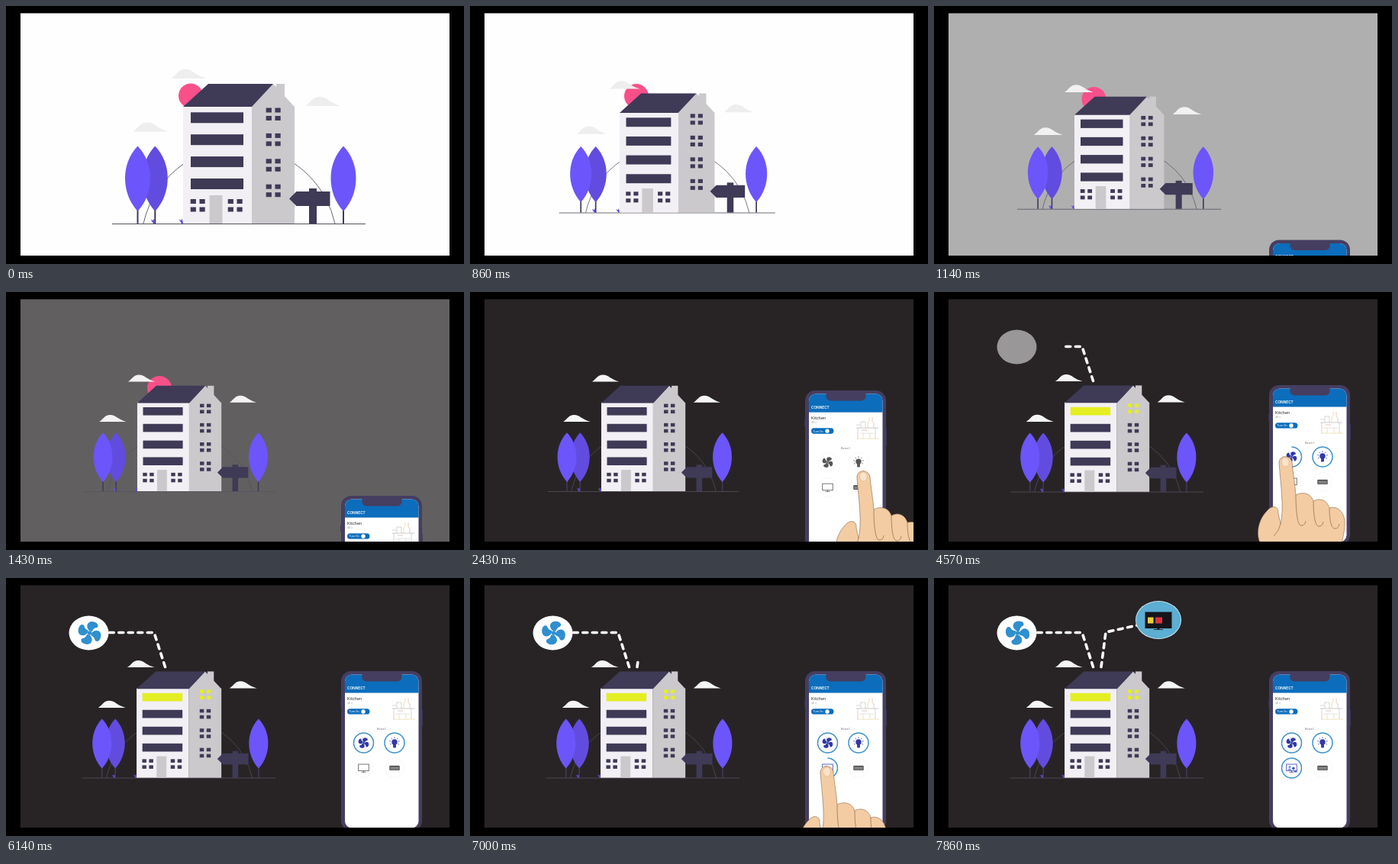
Write an HTML page with a canvas that moves like this. It is 600 by 338 pixels and loops after 8000 ms.

```html
<!DOCTYPE html>
<html lang="en">
<head>
<meta charset="utf-8">
<title>Smart home</title>
<style>
html, body { margin: 0; width: 100%; height: 100%; overflow: hidden; background: #000; }
canvas { display: block; width: 100vw; height: 100vh; }
</style>
</head>
<body>
<canvas id="stage"></canvas>
<script>
const canvas = document.getElementById('stage');
const c = canvas.getContext('2d');
const W = 600, H = 338, LOOP = 8000, FPS = 7;
const ratio = window.devicePixelRatio || 1;
canvas.width = W * ratio;
canvas.height = H * ratio;

const DARK = '#3f3a56', VIOLET = '#6c55fa', SKIN = '#f3cca3', BLUE = '#0b6dbc';
const RING = '#3f93cc', ACTIVE = '#3039a8', IDLE = '#575558', LIT = '#e4ee22';

const clamp = v => Math.max(0, Math.min(1, v));
const span = (f, a, b) => clamp((f - a) / (b - a));
const mix = (a, b, p) => a + (b - a) * p;
const mixRgb = (a, b, p) => `rgb(${a.map((v, k) => Math.round(mix(v, b[k], p)))})`;

// Piecewise linear track of [step, ...values]
function track(f, keys) {
  if (f <= keys[0][0]) return keys[0].slice(1);
  for (let k = 1; k < keys.length; k++) {
    const a = keys[k - 1], b = keys[k];
    if (f <= b[0]) return a.slice(1).map((v, n) => mix(v, b[n + 1], span(f, a[0], b[0])));
  }
  return keys[keys.length - 1].slice(1);
}

function rect(x, y, w, h, color) {
  c.fillStyle = color;
  c.fillRect(x, y, w, h);
}
function poly(points, color) {
  c.beginPath();
  points.forEach(p => c.lineTo(...p));
  c.closePath();
  c.fillStyle = color;
  c.fill();
}
function oval(x, y, rx, ry, color) {
  c.beginPath();
  c.ellipse(x, y, rx, ry, 0, 0, Math.PI * 2);
  c.fillStyle = color;
  c.fill();
}
function box(x, y, w, h, r, color) {
  c.beginPath();
  c.roundRect(x, y, w, h, r);
  c.fillStyle = color;
  c.fill();
}
function line(points, color, width) {
  c.beginPath();
  points.forEach(p => c.lineTo(...p));
  c.strokeStyle = color;
  c.lineWidth = width;
  c.stroke();
}
function text(str, x, y, size, color, weight = 400, align = 'left') {
  c.font = `${weight} ${size}px Roboto, sans-serif`;
  c.textAlign = align;
  c.fillStyle = color;
  c.fillText(str, x, y);
}
function at(x, y, draw) {
  c.save();
  c.translate(x, y);
  draw();
  c.restore();
}

function cloud(x, y, color) {
  c.beginPath();
  c.moveTo(x, y + 12);
  c.bezierCurveTo(x + 7, y + 8, x + 9, y, x + 19, y);
  c.bezierCurveTo(x + 29, y, x + 32, y + 8, x + 47, y + 12);
  c.closePath();
  c.fillStyle = color;
  c.fill();
}

function tree(x, color) {
  rect(x - 1, 262, 2, 23, DARK);
  c.beginPath();
  c.moveTo(x, 183.5);
  c.bezierCurveTo(x + 22, 206, x + 22, 245, x, 269);
  c.bezierCurveTo(x - 22, 245, x - 22, 206, x, 183.5);
  c.fillStyle = color;
  c.fill();
}

function sprout(x) {
  poly([[x, 285], [x - 3.5, 279.5], [x - 0.5, 281], [x + 0.8, 278.5], [x + 2, 285]], '#5f4ce0');
}

function panes(x, y, gapX, color) {
  for (const dx of [0, gapX]) for (const dy of [0, 10.5]) rect(x + dx, y + dy, 7.2, 6, color);
}

function house(lit) {
  poly([[322, 132], [350, 102], [378, 132], [378, 285], [322, 285]], '#cbc9cc');
  rect(354, 102, 11, 22, '#cbc9cc');
  rect(232, 131, 90, 154, '#f2f0f4');
  poly([[232, 132], [265, 102], [350, 102], [322, 132]], DARK);
  for (let k = 0; k < 4; k++) {
    const color = lit && k === 0 ? LIT : DARK;
    rect(242, 139.3 + k * 28.9, 69, 14, color);
    panes(340.7, 133.5 + k * 33.4, 11.8, color);
  }
  panes(241.7, 253, 11.8, DARK);
  panes(290.7, 253, 11.8, DARK);
  rect(266.5, 248, 17, 37, '#cbc9cc');
}

function sign() {
  rect(397, 239, 10, 46, DARK);
  poly([[371, 252.5], [380.5, 243], [424.5, 243], [424.5, 262], [380.5, 262]], DARK);
}

function scenery(f, night) {
  const [s, x, y] = track(f, [[0, 1, 0, 0], [10, 0.755, -3.2, 45.8], [17, 0.755, -3.2, 45.8], [22, 0.761, -5.5, 44.8]]);
  const place = draw => {
    c.save();
    c.translate(x, y);
    c.scale(s, s);
    draw();
    c.restore();
  };
  place(() => {
    c.beginPath();
    c.arc(305.5, 312.7, 128.5, Math.PI * 1.069, Math.PI * 1.931);
    c.strokeStyle = '#55525f';
    c.lineWidth = 0.9;
    c.stroke();
  });
  if (f < 15) {
    const [sx, sy] = track(f, [[0, 242, 117.5], [6, 218, 118], [10, 201, 126], [14, 214, 153]]);
    oval(sx, sy, 16, 16, '#f9508a');
  }
  place(() => {
    const color = mixRgb([238, 238, 238], [246, 245, 246], night);
    [[216, 83], [392, 119], [166, 152.5]].forEach(p => cloud(...p, color));
    rect(139, 285, 332, 1, '#55525f');
    tree(195.3, '#614cdf');
    tree(172.5, VIOLET);
    sprout(193);
    sprout(230);
    house(f >= 20);
    tree(442, VIOLET);
    sign();
  });
}

function fan(r, color, turn) {
  c.save();
  c.scale(r / 15, r / 15);
  c.rotate(turn);
  c.fillStyle = color;
  for (let k = 0; k < 4; k++) {
    c.rotate(Math.PI / 2);
    c.beginPath();
    c.moveTo(-1, -2.5);
    c.bezierCurveTo(-8, -6, -7, -14, 0, -15);
    c.bezierCurveTo(8, -16, 9.5, -10, 5.5, -8.5);
    c.quadraticCurveTo(3, -7, 2.5, -2.5);
    c.fill();
  }
  oval(0, 0, 2.6, 2.6, color);
  c.restore();
}

function bulb(color) {
  oval(0, -1, 3.7, 3.7, color);
  rect(-1.9, 1.5, 3.8, 4.8, color);
  for (let k = 0; k < 7; k++) {
    const a = Math.PI * (0.85 + k * 0.217);
    const u = Math.cos(a), v = Math.sin(a);
    line([[u * 5, v * 5 - 1], [u * 6.8, v * 6.8 - 1]], color, 0.8);
  }
}

function monitor(color, on) {
  c.strokeStyle = color;
  c.lineWidth = 0.9;
  c.strokeRect(-6.8, -5, 13.6, 8.6);
  line([[0, 3.6], [0, 5.2]], color, 1);
  line([[-3, 5.4], [3, 5.4]], color, 0.8);
  if (on) {
    oval(-2.5, -1.5, 1.6, 1.6, '#6f8fd8');
    oval(2.4, 0.4, 1.8, 1.8, color);
    rect(-4.4, 0.8, 3.6, 2, '#6f8fd8');
    rect(3.5, 3.2, 3.5, 2.2, color);
  }
}

function cooler() {
  box(-6.8, -3.2, 13.6, 6.2, 1, '#5d5b5e');
  rect(-5.6, -0.6, 11.2, 0.8, '#c4c4c4');
  rect(-5.6, 1.2, 11.2, 0.6, '#aaa');
}

function button(x, y, progress, draw) {
  at(x, y, () => {
    c.lineWidth = 0.6;
    c.strokeStyle = '#f1f1f1';
    c.beginPath();
    c.arc(0, 0, 12.5, 0, Math.PI * 2);
    c.stroke();
    draw();
    if (progress > 0) {
      c.beginPath();
      c.arc(0, 0, 13, -Math.PI / 2, Math.PI * (2 * progress - 0.5));
      c.strokeStyle = RING;
      c.lineWidth = 1.5;
      c.stroke();
    }
  });
}

function kitchen() {
  const grey = '#b9b5bb', gold = '#e6d9a0';
  line([[506, 171], [535, 171]], grey, 0.7);
  line([[507, 185], [536, 185]], gold, 0.7);
  line([[508, 171], [508, 185]], grey, 0.6);
  line([[531, 171], [531, 185]], grey, 0.6);
  line([[510, 178], [529, 178]], '#d6cfd8', 0.6);
  line([[515, 178], [515, 185]], gold, 0.7);
  line([[524, 178], [524, 185]], gold, 0.7);
  line([[512, 171], [512, 163], [518, 163], [518, 171]], grey, 0.6);
  line([[521, 171], [521, 164], [523, 162], [523, 157]], gold, 0.8);
  line([[527, 157], [527, 163], [529, 165], [529, 171]], '#d8b6a4', 0.7);
  line([[506, 167], [511, 167]], grey, 0.6);
  line([[513, 174], [520, 174]], '#d8b6a4', 0.8);
}

function phone(f) {
  const top = Math.max(122, 267 - 19.7 * (f - 10));
  if (top > 330) return;
  at(0, top - 122, () => {
    rect(544, 172, 1.8, 22, DARK);
    rect(438.2, 160, 1.5, 9, DARK);
    box(439, 122, 106, 209, 13, '#453e60');
    c.save();
    c.beginPath();
    c.roundRect(444, 126.5, 96.5, 201, 9);
    c.clip();
    rect(444, 126, 97, 203, '#fff');
    rect(444, 126, 97, 24.5, BLUE);
    c.restore();
    box(466.5, 124, 52, 11.5, [0, 0, 6, 6], '#453e60');
    text('CONNECT', 447, 145.6, 5.2, '#fff', 500);
    text('Kitchen', 447, 159.8, 5.7, '#333');
    text('40 c', 447.2, 165.3, 3.6, '#999');
    box(447, 171.2, 29.5, 7.4, 3.7, BLUE);
    text('Turn On', 449.5, 176.4, 3.8, '#fff');
    oval(468, 175, 2.7, 2.7, '#fff');
    kitchen();
    text('Room1', 492, 198.6, 3.8, '#777', 400, 'center');
    button(468.5, 216, span(f, 30, 34), () => fan(7.2, f >= 30 ? ACTIVE : IDLE, 0.35));
    button(509, 216, span(f, 19, 23), () => bulb(f >= 19 ? ACTIVE : IDLE));
    button(468.5, 249, span(f, 47, 51), () => monitor(f >= 47 ? '#4355b4' : '#666', f >= 47));
    button(509, 249, 0, cooler);
  });
}

function hand(f) {
  const [x, y] = track(f, [
    [14, 538, 345], [17, 515, 235], [18.5, 509, 217], [21, 509, 217], [24, 509, 345],
    [27, 462, 345], [30, 460, 216], [33, 460, 216], [37, 462, 345],
    [43.5, 467, 345], [46.5, 467, 247], [50, 467, 247], [53, 467, 345]]);
  if (y > 330) return;
  at(x, y, () => {
    c.beginPath();
    c.moveTo(-8, 8);
    c.bezierCurveTo(-8, -3, 7, -3, 9, 7);
    c.bezierCurveTo(10, 20, 13, 36, 14, 50);
    c.bezierCurveTo(21, 46, 33, 46, 37, 58);
    c.bezierCurveTo(46, 53, 55, 57, 58, 67);
    c.bezierCurveTo(67, 64, 76, 70, 78, 83);
    c.bezierCurveTo(79, 96, 75, 106, 73, 120);
    c.lineTo(-28, 120);
    c.bezierCurveTo(-40, 108, -37, 84, -24, 71);
    c.bezierCurveTo(-17, 62, -8, 65, -9, 74);
    c.lineTo(-6, 88);
    c.bezierCurveTo(-1, 66, -6, 36, -8, 8);
    c.closePath();
    c.fillStyle = SKIN;
    c.fill();
    c.strokeStyle = '#8a6249';
    c.lineWidth = 0.6;
    c.stroke();
    // Nail and folded fingers
    c.beginPath();
    c.ellipse(0.3, 7, 5, 6, -0.1, 0, Math.PI * 2);
    c.fillStyle = '#fae3ca';
    c.fill();
    c.strokeStyle = '#dfb088';
    c.stroke();
    for (const [fx, fy, h] of [[14, 50, 40], [37, 58, 33], [58, 67, 27]]) {
      c.beginPath();
      c.moveTo(fx, fy);
      c.bezierCurveTo(fx, fy + h * 0.5, fx + 2, fy + h, fx + 7, fy + h);
      c.quadraticCurveTo(fx + 12, fy + h, fx + 13, fy + h - 6);
      c.strokeStyle = '#9c7052';
      c.lineWidth = 0.8;
      c.stroke();
    }
    c.beginPath();
    c.moveTo(-6, 88);
    c.quadraticCurveTo(-8, 97, -15, 104);
    c.stroke();
  });
}

function dashes(points, progress) {
  if (progress <= 0) return;
  const lengths = points.slice(1).map((p, k) => Math.hypot(p[0] - points[k][0], p[1] - points[k][1]));
  let left = progress * lengths.reduce((a, b) => a + b);
  const path = [points[0]];
  for (let k = 0; k < lengths.length && left > 0; k++) {
    const p = Math.min(1, left / lengths[k]);
    path.push(points[k + 1].map((v, n) => mix(points[k][n], v, p)));
    left -= lengths[k];
  }
  c.save();
  c.setLineDash([6, 6.5]);
  c.lineCap = 'round';
  c.lineJoin = 'round';
  line(path, '#fff', 3.6);
  c.restore();
}

function faded(alpha, draw) {
  c.save();
  c.globalAlpha = alpha;
  draw();
  c.restore();
}

function fanBubble(f) {
  dashes([[208.5, 116.5], [194, 71.5], [134, 71.5]], span(f, 29, 33.6));
  faded(span(f, 29.8, 34), () => oval(108.5, 72, 26, 22.5, '#fff'));
  faded(span(f, 33.5, 36), () => at(109.5, 72, () => fan(15.5, '#2f8fcf', (f - 43) * 0.5 + 0.3)));
}

function tvBubble(f) {
  dashes([[219, 116.5], [225, 71], [266, 62]], span(f, 48.5, 53));
  faded(span(f, 49, 53), () => {
    oval(294, 55, 30, 25, '#e6f3f8');
    oval(294, 55, 29.2, 24.2, '#5caed2');
  });
  faded(span(f, 51, 54), () => {
    rect(276.5, 44.5, 35, 21.5, '#15151a');
    rect(280, 51.5, 7.5, 8, '#e9cf3a');
    rect(290, 51.5, 9, 8, '#d8343c');
    rect(292.5, 66, 3, 1.2, '#222');
    rect(288, 67, 12, 0.9, '#222');
  });
}

function draw(ms) {
  const f = Math.floor((ms % LOOP + 4) * FPS / 1000) % (LOOP / 1000 * FPS);
  c.setTransform(canvas.width / W, 0, 0, canvas.height / H, 0, 0);
  rect(0, 0, W, H, '#000');
  c.save();
  c.beginPath();
  c.rect(19, 9.5, 562, 317.5);
  c.clip();
  const night = span(f, 6, 11.5);
  rect(0, 0, W, H, mixRgb([254, 254, 254], [40, 36, 38], night));
  scenery(f, night);
  fanBubble(f);
  tvBubble(f);
  phone(f);
  hand(f);
  c.restore();
}

const start = performance.now();
function tick() {
  draw(performance.now() - start);
  requestAnimationFrame(tick);
}
tick();
</script>
</body>
</html>
```
